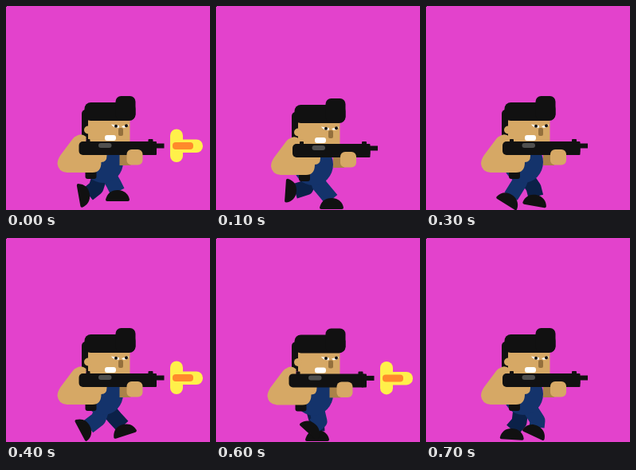
Write an HTML page with a canvas that moves like this. It is 256x256 px and loops after 0.8 s.

```html
<!DOCTYPE html>
<html>
<head>
<meta charset="utf-8">
<style>
html, body { margin: 0; height: 100%; overflow: hidden; background: #e342cc; }
canvas { display: block; }
</style>
</head>
<body>
<canvas id="stage" width="256" height="256"></canvas>
<script>
const ctx = document.getElementById('stage').getContext('2d');
const PINK = '#e342cc', BLACK = '#111111', SKIN = '#d6a865', SHADE = '#aa8248';
const BLUE = '#14336b', NAVY = '#0b2148';

// Each pose: knee x, knee y, foot x, foot y, foot angle
const nearLeg = [
  [135, 223, 140, 238, 0], [130, 225, 145, 248, 0],
  [127, 222, 123, 249, 0], [117, 222, 104, 243, 32],
  [116, 227, 99, 239, 62], [119, 228, 105, 241, 57],
  [130, 230, 120, 239, 42], [140, 229, 137, 242, 25]
];
const farLeg = [
  [113, 228, 98, 237, 80], [113, 228, 94, 232, 94],
  [117, 231, 101, 236, 108], [135, 228, 137, 244, 10],
  [137, 226, 148, 241, -18], [134, 228, 151, 243, -37],
  [126, 228, 127, 248, 0], [117, 231, 108, 246, 3]
];
const bobs = [0, 3, 1.3, 0, 0, 3, 0.4, 0];

function box(color, x, y, w, h, r = 0) {
  ctx.fillStyle = color;
  ctx.beginPath();
  ctx.roundRect(x, y, w, h, r);
  ctx.fill();
}

function oval(color, x, y, rx, ry = rx) {
  ctx.fillStyle = color;
  ctx.beginPath();
  ctx.ellipse(x, y, rx, ry, 0, 0, 7);
  ctx.fill();
}

function shape(color, d) {
  ctx.fillStyle = color;
  ctx.fill(new Path2D(d));
}

function leg(color, hipX, hipY, [kx, ky, fx, fy, deg]) {
  const a = deg * Math.PI / 180;
  ctx.strokeStyle = color;
  ctx.lineWidth = 19;
  ctx.lineJoin = 'round';
  ctx.lineCap = 'butt';
  ctx.beginPath();
  ctx.moveTo(hipX, hipY);
  ctx.lineTo(kx, ky);
  ctx.lineTo(fx + 5 * Math.sin(a), fy - 5 * Math.cos(a));
  ctx.stroke();
  ctx.save();
  ctx.translate(fx, fy);
  ctx.rotate(a);
  shape(BLACK, 'M-15 5C-13-3-8-7 0-7C9-7 14-1 15 5Q15 7 13 7H-13Q-15 7-15 5Z');
  ctx.restore();
}

function head() {
  box(BLACK, 95, 130, 14, 37, 5);
  box(SKIN, 103, 139, 52.5, 36, 2);
  oval(SKIN, 103, 155.5, 5);
  box(BLACK, 98.5, 121, 64, 23, 8);
  box(BLACK, 137.5, 113, 25, 30, 7);
  shape('#fff', 'M132 148.5L142 150V152.5Q136 154 132 148.5Z');
  shape('#fff', 'M145 151L154 148.5Q153 153 147 152.8Z');
  oval(BLACK, 138, 150.7, 2);
  oval(BLACK, 151, 150.2, 2);
  box('#94703d', 141, 153, 6, 10, 2);
  box('#fff', 124, 162, 14, 7, 3);
}

function armsAndGun() {
  box(BLACK, 104, 200, 14, 17, 3);
  box(SHADE, 147, 186, 14, 14);
  shape(SKIN, 'M93 163Q99 159 105 164V182H131V188Q131 196 124 196Q124 209 113 209' +
    'H81Q70 208 69 198Q69 193 73 187L88 167Q90 164 93 163Z');
  box(BLACK, 96, 170, 97.5, 17, 5);
  box(BLACK, 105, 167, 5, 5, 1);
  box(BLACK, 183, 167, 6, 5, 1);
  box(BLACK, 187, 170, 6.5, 17, 1);
  box(BLACK, 190, 172.5, 13, 6);
  box('#50504f', 120.5, 172, 16.5, 6, 3);
  box(SKIN, 156, 180, 20, 19.5, 6);
}

function flash() {
  box('#fff04a', 206, 154.5, 16, 41.5, 8);
  box('#fff04a', 206, 167.5, 41, 16.5, 8);
  box('#ff8a2b', 209, 171, 26, 9, 4);
}

function draw(step) {
  const bob = bobs[step], firing = step % 2 === 0;
  ctx.fillStyle = PINK;
  ctx.fillRect(0, 0, 256, 256);
  box(BLACK, 0, 0, 1, 1);
  leg(NAVY, 120, 206 + bob, farLeg[step]);
  leg(BLUE, 124, 204 + bob, nearLeg[step]);
  ctx.save();
  ctx.translate(0, bob);
  oval(BLUE, 122, 196, 25, 26);
  head();
  if (firing) flash();
  ctx.translate(firing ? -4.5 : 0, 0);
  armsAndGun();
  ctx.restore();
}

function tick() {
  draw(Math.floor(performance.now() / 100) % 8);
  requestAnimationFrame(tick);
}
tick();
</script>
</body>
</html>
```
